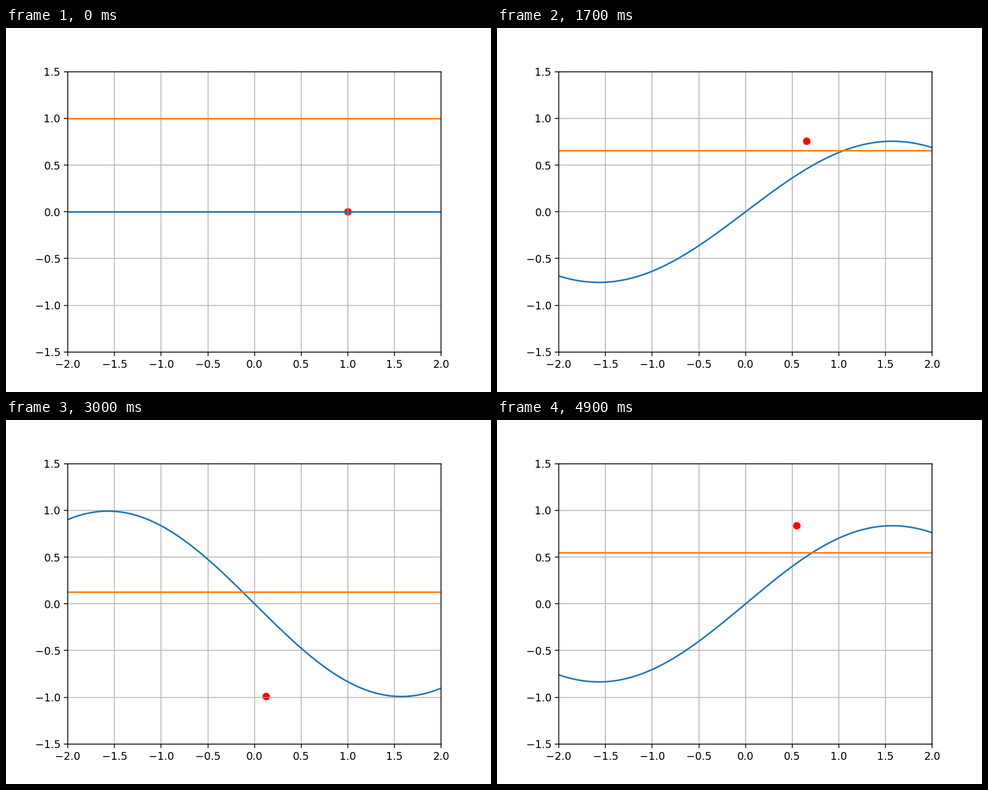
A matplotlib script for the animation above (5000 ms loop, 864 by 648 pixels).

```python
import numpy as np
import matplotlib.pyplot as plt
from matplotlib.animation import FuncAnimation
from matplotlib.patches import Circle

FRAMES = 50
INTERVAL = 100  # ms

plt.rcParams["font.family"] = "DejaVu Sans"
fig, ax = plt.subplots(figsize=(6.4, 4.8), dpi=135)
ax.set_aspect("equal")
ax.set_xlim(-2, 2)
ax.set_ylim(-1.5, 1.5)
ax.set_xticks(np.arange(-2, 2.1, 0.5))
ax.set_yticks(np.arange(-1.5, 1.6, 0.5))
ax.grid()

x = np.linspace(-2, 2, 201)
wave, = ax.plot(x, 0 * x, color="C0")
level, = ax.plot(x, 0 * x + 1, color="C1")
# A patch sits below the grid and the lines.
dot = ax.add_patch(Circle((1, 0), 0.04, facecolor="red", linewidth=0))


def update(frame):
    t = 2 * np.pi * frame / FRAMES
    angle = 2 * np.pi * t
    c, s = np.cos(angle), np.sin(angle)
    wave.set_ydata(s * np.sin(x))
    level.set_ydata(np.full_like(x, c))
    dot.center = (c, s)
    return wave, level, dot


anim = FuncAnimation(fig, update, frames=FRAMES, interval=INTERVAL,
                     repeat=True, repeat_delay=0)
plt.show()
```
